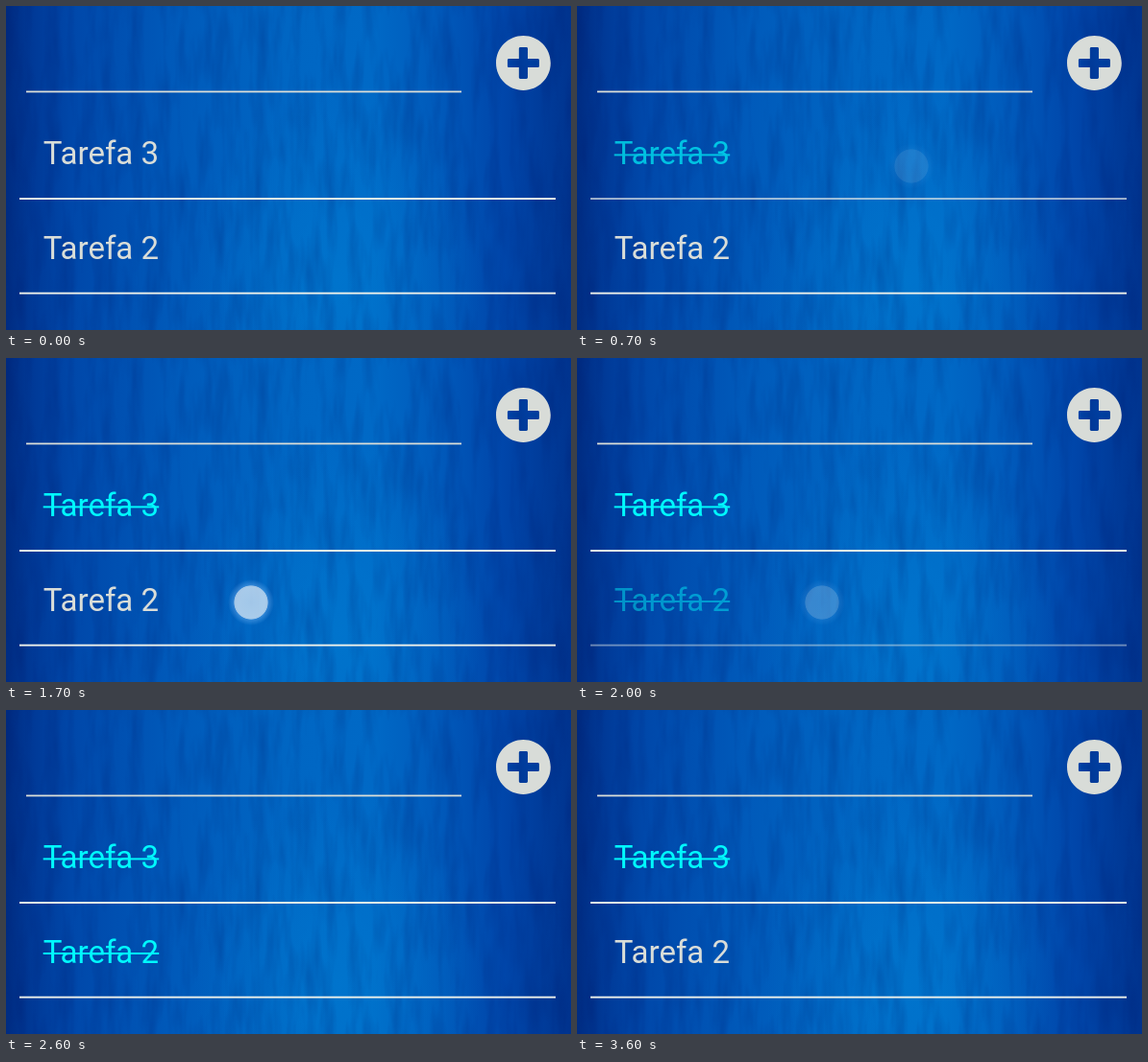
Recreate the animation shown at these times as an HTML page. Size 588 by 338 pixels, loop 3800 ms.

```html
<!DOCTYPE html>
<html lang="pt">
<head>
<meta charset="utf-8">
<title>Tarefas</title>
<style>
html, body { margin: 0; width: 100%; height: 100%; overflow: hidden; background: #0058b8; }
svg { display: block; width: 588px; height: 338px; }
text { font: 33px Roboto, sans-serif; }
</style>
</head>
<body>
<svg viewBox="0 0 588 338">
  <defs>
    <linearGradient id="base">
      <stop offset="0" stop-color="#002c82"/>
      <stop offset=".05" stop-color="#003a98"/>
      <stop offset=".12" stop-color="#0048aa"/>
      <stop offset=".3" stop-color="#005aba"/>
      <stop offset=".5" stop-color="#0066c3"/>
      <stop offset=".65" stop-color="#0069c6"/>
      <stop offset=".77" stop-color="#0059ba"/>
      <stop offset=".88" stop-color="#0046aa"/>
      <stop offset="1" stop-color="#00348f"/>
    </linearGradient>
    <radialGradient id="shine" gradientUnits="userSpaceOnUse" cx="0" cy="0" r="1"
      gradientTransform="translate(345 285) scale(150 210)">
      <stop offset="0" stop-color="#0080d4" stop-opacity=".5"/>
      <stop offset="1" stop-color="#0080d4" stop-opacity="0"/>
    </radialGradient>
    <filter id="grain" x="0" y="0" width="1" height="1" color-interpolation-filters="sRGB">
      <feTurbulence type="fractalNoise" baseFrequency=".07 .012" numOctaves="3" seed="4"/>
      <feColorMatrix values="0 0 0 0 0  0 0 0 0 .1  0 0 0 0 .42  .9 0 0 0 -.36"/>
    </filter>
    <radialGradient id="dot">
      <stop offset="0" stop-color="#fff" stop-opacity=".96"/>
      <stop offset=".66" stop-color="#fff" stop-opacity="1"/>
      <stop offset=".72" stop-color="#fff" stop-opacity=".95"/>
      <stop offset=".75" stop-color="#8cc4ff" stop-opacity=".5"/>
      <stop offset="1" stop-color="#8cc4ff" stop-opacity="0"/>
    </radialGradient>
  </defs>
  <rect width="588" height="338" fill="url(#base)"/>
  <rect width="588" height="338" fill="url(#shine)"/>
  <rect width="588" height="338" filter="url(#grain)" opacity=".55"/>
  <rect x="21" y="88.5" width="453" height="1.8" fill="#d9ddd8"/>
  <path fill="#d8dcd8" transform="translate(538.4 59.5) scale(.1145) translate(-256 -256)"
    d="M256 8C119 8 8 119 8 256s111 248 248 248 248-111 248-248S393 8 256 8zm144 276c0 6.6-5.4 12-12 12h-92v92c0 6.6-5.4 12-12 12h-56c-6.6 0-12-5.4-12-12v-92h-92c-6.6 0-12-5.4-12-12v-56c0-6.6 5.4-12 12-12h92v-92c0-6.6 5.4-12 12-12h56c6.6 0 12 5.4 12 12v92h92c6.6 0 12 5.4 12 12v56z"/>
  <g id="list"></g>
  <circle id="touch" r="24" fill="url(#dot)"/>
</svg>
<script>
const LOOP = 3800, STEP = 100;
const PRESS = 150, RELEASE = 250, DOT_FADE = 240;
const taps = [
  { row: 0, x: 348, y: 167, down: 310, up: 560 },
  { row: 1, x: 255, y: 255, down: 1700, up: 1900 },
  { row: 1, x: 281, y: 245, down: 2750, up: 2940 }
];

const clamp = v => Math.max(0, Math.min(1, v));
const ease = p => p < .5 ? 2 * p * p : 1 - 2 * (1 - p) ** 2;

function add(parent, tag, attrs) {
  const el = document.createElementNS('http://www.w3.org/2000/svg', tag);
  for (const k in attrs) el.setAttribute(k, attrs[k]);
  return parent.appendChild(el);
}

function makeRow(label, y) {
  const group = add(document.getElementById('list'), 'g', {});
  const text = add(group, 'text', { x: 38.7, y });
  text.textContent = label;
  const strike = add(group, 'rect', { x: 38.7, y: y - 10.6, width: 120.5, height: 2, fill: '#00f8fc' });
  add(group, 'rect', { x: 14, y: y + 35.1, width: 558, height: 1.9, fill: '#eef0ea' });
  return { group, text, strike };
}

const rows = [makeRow('Tarefa 3', 165), makeRow('Tarefa 2', 263.6)];
const touch = document.getElementById('touch');

function rowOpacity(tap, t) {
  const press = ease(clamp((t - tap.down) / PRESS));
  const back = ease(clamp((t - tap.up) / RELEASE));
  return 1 - .8 * press * (1 - back);
}

function dotOpacity(tap, t) {
  return t < tap.down ? 0 : .66 * (1 - clamp((t - tap.up) / DOT_FADE)) ** 2;
}

function draw(t) {
  let dot = 0;
  rows.forEach((row, i) => {
    let done = false, opacity = 1;
    for (const tap of taps) {
      if (tap.row !== i) continue;
      if (t >= tap.up) done = !done;
      opacity = Math.min(opacity, rowOpacity(tap, t));
    }
    row.group.setAttribute('opacity', opacity);
    row.text.setAttribute('fill', done ? '#00f8fc' : '#d9ddd8');
    row.strike.setAttribute('visibility', done ? 'visible' : 'hidden');
  });
  for (const tap of taps) {
    const o = dotOpacity(tap, t);
    if (o <= 0) continue;
    dot = o;
    touch.setAttribute('cx', tap.x);
    touch.setAttribute('cy', tap.y);
  }
  touch.setAttribute('opacity', dot);
}

const start = performance.now();
let last = -1;
function tick() {
  const t = Math.floor((performance.now() - start) % LOOP / STEP) * STEP;
  if (t !== last) draw(last = t);
  requestAnimationFrame(tick);
}
tick();
</script>
</body>
</html>
```
